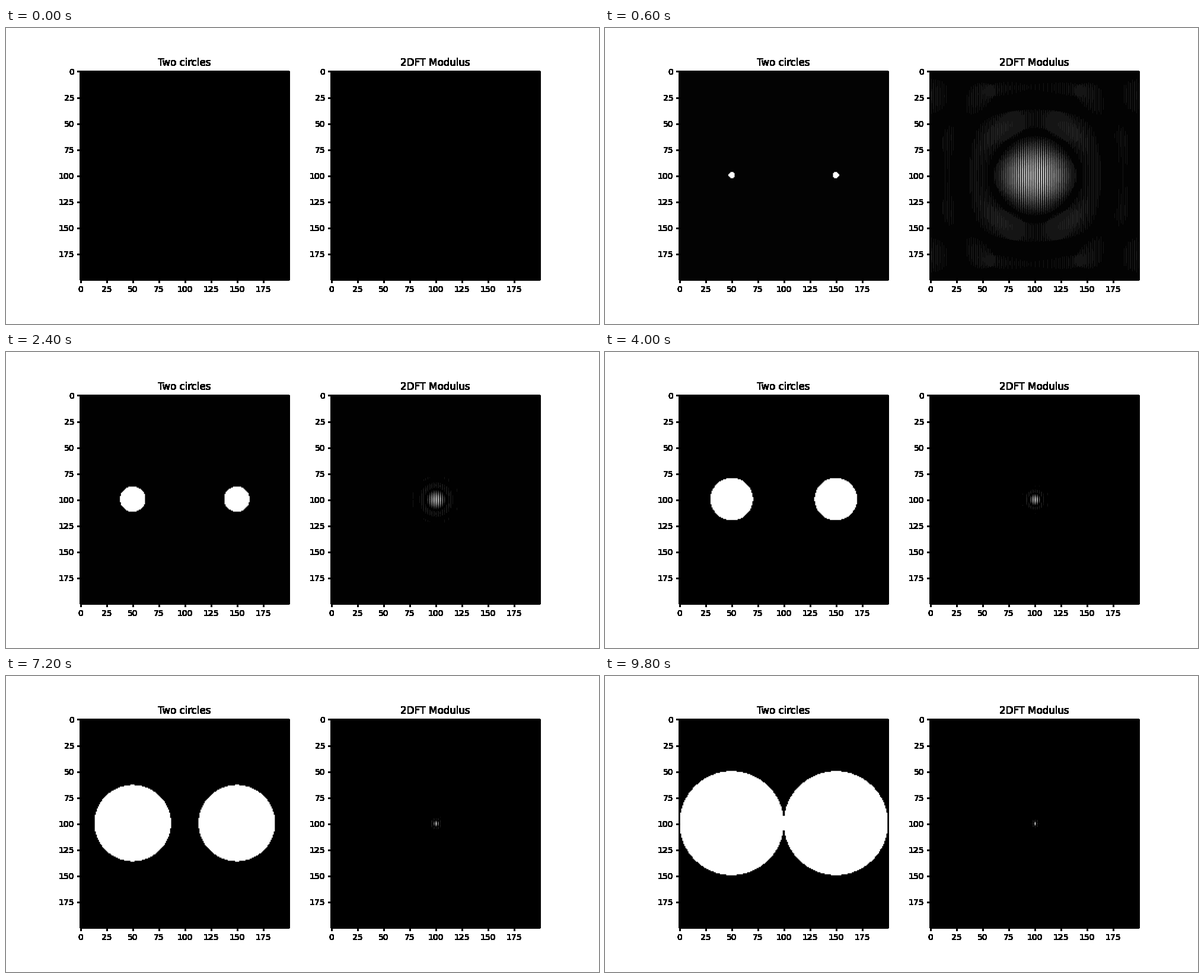
A matplotlib script that plays this animation: 1000x500 px, repeating every 10000 ms.

```python
import matplotlib.pyplot as plt
import numpy as np
from matplotlib.animation import FuncAnimation
from matplotlib.patches import Rectangle

FRAMES = 50
SIZE = 200
RADII = np.linspace(0, 50, FRAMES)
AXIS = np.linspace(-100, 100, SIZE)
X, Y = np.meshgrid(AXIS, AXIS)


def two_circles(radius):
    """Two discs side by side, 100 units apart."""
    dist = np.minimum(np.hypot(X + 50, Y), np.hypot(X - 50, Y))
    return (dist < radius).astype(float)


def modulus(img):
    return np.abs(np.fft.fftshift(np.fft.fft2(img)))


def harden(img, dpi):
    """Turn every touched pixel solid black."""
    out = np.zeros(img.shape, np.uint8)
    out[..., 3] = 255 * (img[..., 3] > 0)
    return out, 0, 0


def posterise(img, dpi):
    """Flatten greys into 16 bands, each shown at its mean level."""
    level = np.rint(img[..., 0] * 255).astype(int)
    band = level // 16
    count = np.bincount(band.ravel(), minlength=16)
    total = np.bincount(band.ravel(), weights=level.ravel(), minlength=16)
    mean = np.rint(total / np.maximum(count, 1)).astype(np.uint8)
    out = np.full(img.shape, 255, np.uint8)
    out[..., :3] = mean[band][..., None]
    return out, 0, 0


def make_panel(ax, title):
    image = ax.imshow(np.zeros((SIZE, SIZE)), cmap="gray", vmin=0, vmax=1)
    ax.set_title(title).set_agg_filter(harden)
    ax.xaxis.set_agg_filter(harden)
    ax.yaxis.set_agg_filter(harden)
    # crisp border beneath the image
    ax.add_artist(Rectangle((0, 0), 1, 1, transform=ax.transAxes, fill=False,
                            lw=0.8, zorder=-1, clip_on=False,
                            agg_filter=harden))
    return image


fig, (left, right) = plt.subplots(1, 2, figsize=(10, 5), dpi=100)
fig.subplots_adjust(left=0.125, right=0.9, bottom=0.125, top=0.88, wspace=0.2)
fig.set_agg_filter(posterise)
circles = make_panel(left, "Two circles")
spectrum = make_panel(right, "2DFT Modulus")


def update(i):
    img = two_circles(RADII[i])
    circles.set_data(img)
    spectrum.set_data(modulus(img))
    spectrum.autoscale()
    return circles, spectrum


anim = FuncAnimation(fig, update, frames=FRAMES, interval=200, repeat=True,
                     repeat_delay=0, blit=False)
plt.show()
```
